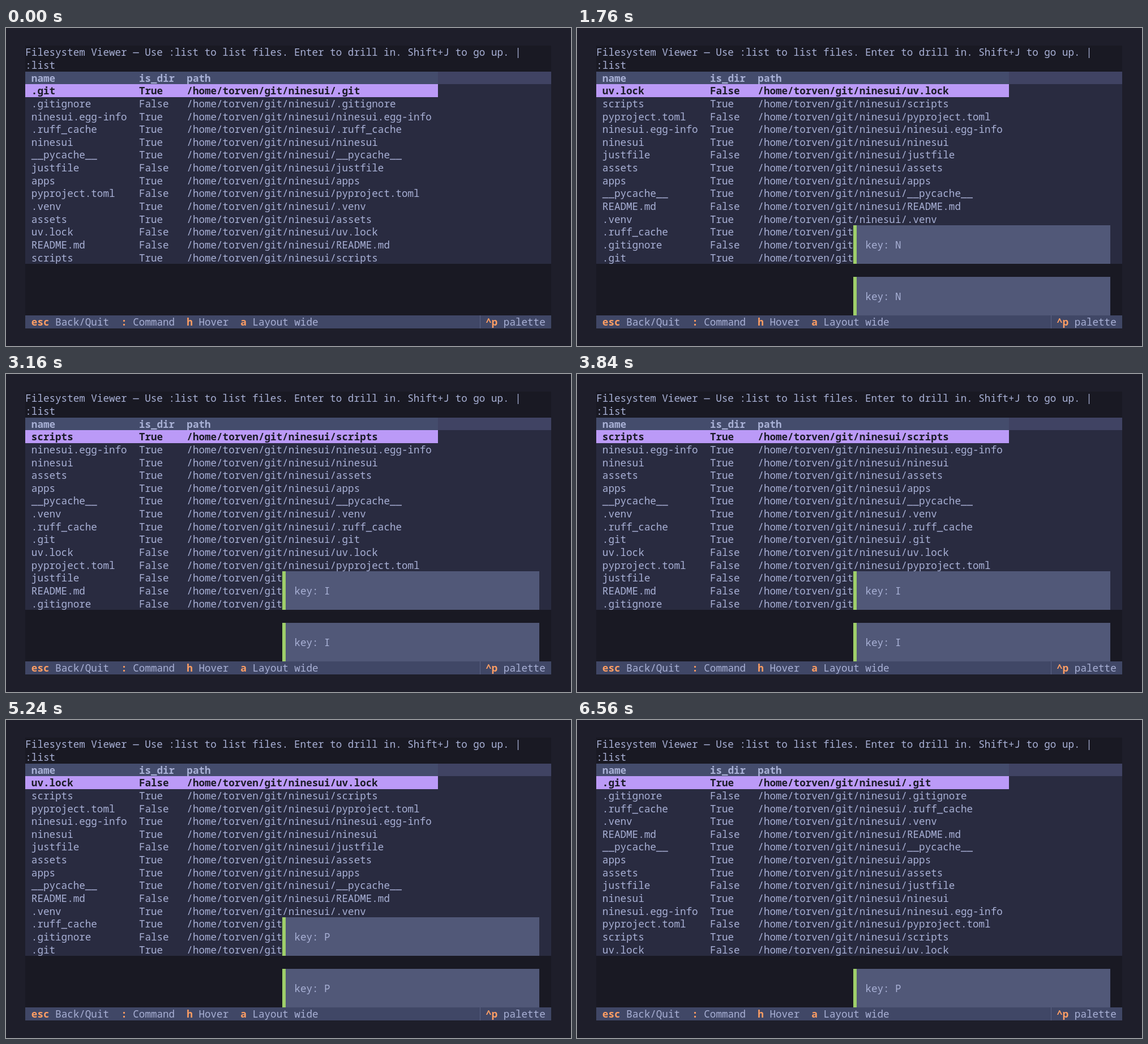
An HTML page with a canvas for the animation above (6600 ms loop, 998 px wide and 561 px high).

```html
<!DOCTYPE html>
<html lang="en">
<head>
<meta charset="utf-8">
<title>Filesystem Viewer</title>
<style>
  html, body { margin: 0; width: 100%; height: 100%; overflow: hidden; background: #1e1e2a; }
  canvas { display: block; }
</style>
</head>
<body>
<canvas id="stage" width="998" height="561"></canvas>
<script>
const ctx = document.getElementById('stage').getContext('2d');

// Terminal grid
const LEFT = 34.3, TOP = 31.2, CELL = 10.557, ROW = 22.66, COLS = 88, LINES = 22;
const BASELINE = 18;
const FONT = '17.595px "Noto Sans Mono", monospace';

const color = {
  frame: '#1e1e2a', screen: '#191923', table: '#292b40',
  head: '#444c6c', headRest: '#404363', cursor: '#bb9af7',
  footer: '#404766', divider: '#5b6284', toast: '#515878',
  text: '#a9b1d6', dark: '#1a1b26', key: '#ff9e64', success: '#9ece6a'
};

const HOME = '/home/torven/git/ninesui/';
const DIRS = '.git ninesui.egg-info .ruff_cache ninesui __pycache__ apps .venv assets scripts'.split(' ');
const FILES = ('.git .gitignore ninesui.egg-info .ruff_cache ninesui __pycache__ justfile ' +
  'apps pyproject.toml .venv assets uv.lock README.md scripts').split(' ')
  .map(name => ({ name, is_dir: DIRS.includes(name) ? 'True' : 'False', path: HOME + name }));

// Key presses and toast expiries, in ticks
const TICK = 40, LOOP = 6600;
const PRESS = [1, 9, 18, 27, 35, 44, 53, 62, 70, 79, 87, 96, 105, 114, 122, 131, 140, 148, 157];
const EXPIRE = [17, 26, 34, 43, 52, 61, 69, 78, 86, 96, 104, 113, 121, 130, 139, 148, 156, 164, 999];
const KEYS = 'NNNNNNIIIIIIPPPPPPP';
const FIELD = { N: 'name', I: 'is_dir', P: 'path' };

// Each press sorts the previous order by one column, flipping direction
const orders = [FILES];
[...KEYS].forEach((key, i) => {
  const field = FIELD[key], sign = i % 2 ? -1 : 1;
  orders.push([...orders[i]].sort((a, b) =>
    sign * ((a[field] > b[field]) - (a[field] < b[field]))));
});

const px = col => LEFT + col * CELL;
const py = row => TOP + row * ROW;

function box(col, row, cols, rows, fill) {
  const x = Math.round(px(col)), y = Math.round(py(row));
  ctx.fillStyle = fill;
  ctx.fillRect(x, y, Math.round(px(col + cols)) - x, Math.round(py(row + rows)) - y);
}

function print(str, col, row, fill = color.text, bold = false) {
  ctx.font = (bold ? 'bold ' : '') + FONT;
  ctx.fillStyle = fill;
  ctx.fillText(str, px(col), py(row) + BASELINE);
}

function printRow(cells, row, fill, bold) {
  [1, 19, 27].forEach((col, i) => print(cells[i], col, row, fill, bold));
}

function drawTable(files) {
  box(0, 2, COLS, 15, color.table);
  box(0, 2, COLS, 1, color.headRest);
  box(0, 2, 69, 1, color.head);
  box(0, 3, 69, 1, color.cursor);
  printRow(['name', 'is_dir', 'path'], 2, color.text, true);
  files.forEach((f, i) =>
    printRow([f.name, f.is_dir, f.path], 3 + i, i ? color.text : color.dark, !i));
}

function drawToast(key, row) {
  box(43, row, 43, 3, color.toast);
  box(43, row, 0.5, 3, color.success);
  print('key: ' + key, 45, row + 1);
}

function drawFooter() {
  box(0, 21, COLS, 1, color.footer);
  [['esc', 'Back/Quit', 1], [':', 'Command', 16], ['h', 'Hover', 27],
   ['a', 'Layout wide', 36], ['^p', 'palette', 77]].forEach(([key, label, col]) => {
    print(key, col, 21, color.key, true);
    print(label, col + key.length + 1, 21);
  });
  box(76, 21, 0.125, 1, color.divider);
}

function draw(time) {
  const tick = Math.floor((time % LOOP) / TICK);
  const pressed = PRESS.filter(p => p <= tick).length;

  ctx.fillStyle = color.frame;
  ctx.fillRect(0, 0, 998, 561);
  box(0, 0, COLS, LINES, color.screen);
  print('Filesystem Viewer — Use :list to list files. Enter to drill in. Shift+J to go up. |', 0, 0);
  print(':list', 0, 1);
  drawTable(orders[pressed]);

  // Newest toast sits at the bottom
  for (let i = pressed - 1, row = 18; i >= 0 && tick < EXPIRE[i]; i--, row -= 4) {
    drawToast(KEYS[i], row);
  }
  drawFooter();
}

const start = performance.now();
function loop() {
  draw(performance.now() - start);
  requestAnimationFrame(loop);
}
loop();
</script>
</body>
</html>
```
